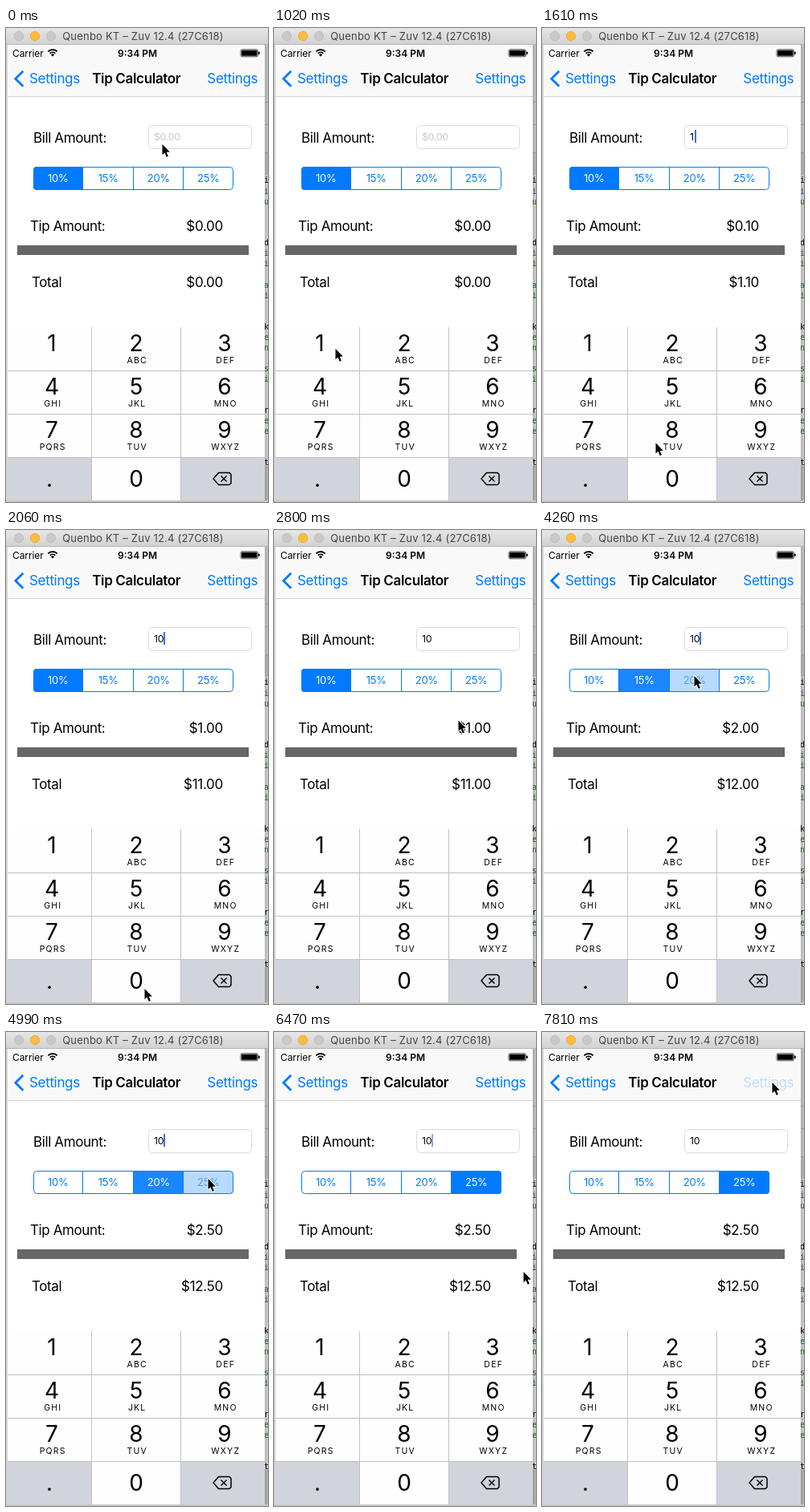
Recreate the animation shown at these times as an HTML page with a canvas. Size 326x591 px, loop 8 s.

```html
<!DOCTYPE html>
<html lang="en">
<head>
<meta charset="utf-8">
<title>Tip Calculator</title>
<style>
  html, body { margin: 0; width: 100%; height: 100%; overflow: hidden; background: #fff; }
  canvas { display: block; width: 326px; height: 591px; }
</style>
</head>
<body>
<canvas id="stage"></canvas>
<script>
const W = 326, H = 591, LOOP = 8000, STEP = 147.1, LAST = 53;
const BLUE = '#007aff', KEY_GREY = '#d1d4da';
const canvas = document.getElementById('stage');
const ctx = canvas.getContext('2d');
const ratio = window.devicePixelRatio || 1;
canvas.width = W * ratio;
canvas.height = H * ratio;
ctx.scale(ratio, ratio);

// Pointer path: [step, x, y]
const path = [
  [0, 194, 145], [2, 176, 185], [5, 99, 348], [7, 76, 400], [9, 79, 408],
  [12, 172, 572], [14, 172, 572], [15, 204, 460], [16, 239, 342],
  [18, 268, 270], [20, 190, 205], [22, 108, 180], [24, 134, 174],
  [26, 134, 174], [28, 189, 182], [30, 189, 182], [32, 251, 183],
  [37, 251, 183], [39, 284, 275], [41, 310, 349], [43, 310, 349],
  [44, 310, 299], [46, 304, 140], [48, 286, 63], [LAST, 286, 63]
];

function pointerAt(step) {
  const i = path.findIndex(p => p[0] >= step);
  const b = path[i], a = path[Math.max(0, i - 1)];
  const k = b[0] === a[0] ? 1 : (step - a[0]) / (b[0] - a[0]);
  return [a[1] + (b[1] - a[1]) * k, a[2] + (b[2] - a[2]) * k];
}

function rect(x, y, w, h, fill) {
  ctx.fillStyle = fill;
  ctx.fillRect(x, y, w, h);
}

function text(str, x, y, size, { color = '#000', weight = 400, align = 'left', track = -0.023 * size, family = 'Inter, Roboto, sans-serif' } = {}) {
  ctx.font = `${weight} ${size}px ${family}`;
  ctx.letterSpacing = track + 'px';
  ctx.textAlign = align;
  ctx.fillStyle = color;
  ctx.fillText(str, x, y);
}

function poly(points, close) {
  ctx.beginPath();
  points.forEach(([x, y]) => ctx.lineTo(x, y));
  if (close) ctx.closePath();
}

function stroke(color, width) {
  ctx.strokeStyle = color;
  ctx.lineWidth = width;
  ctx.stroke();
}

function round(x, y, w, h, r) {
  ctx.beginPath();
  ctx.roundRect(x, y, w, h, r);
}

function drawWindow() {
  rect(0, 0, W, H, '#fff');
  rect(0, 20, 2, H, '#d3d3d3');
  rect(322, 20, 4, 135, '#f0f0f0');
  rect(322, 155, 4, 28, '#e2e2e2');
  rect(322, 546, 4, 45, '#dcdcdc');
  [92, 120, 155].forEach(y => rect(322, y, 4, 1, '#c4c4c4'));
  const code = [
    ['i', 193, '#000'], ['i', 207, '#703daa'], ['u', 220, '#207a20'], ['d', 271, '#000'],
    ['i', 284, '#207a20'], ['i', 297, '#207a20'], ['a', 324, '#207a20'], ['i', 337, '#207a20'],
    ['k', 376, '#000'], ['e', 389, '#207a20'], ['n', 402, '#207a20'], ['s', 428, '#207a20'],
    ['i', 441, '#207a20'], ['r', 480, '#000'], ['e', 493, '#207a20'], ['e', 506, '#207a20'],
    ['t', 545, '#000']
  ];
  code.forEach(([c, y, color]) => text(c, 321, y, 10, { color, track: 0, family: '"DejaVu Sans Mono", monospace' }));

  // Window shadow
  const shade = ctx.createLinearGradient(322, 0, 330, 0);
  shade.addColorStop(0, 'rgba(0,0,0,0.3)');
  shade.addColorStop(1, 'rgba(0,0,0,0.08)');
  rect(322, 20, 4, H, shade);

  const bar = ctx.createLinearGradient(0, 0, 0, 20);
  bar.addColorStop(0, '#e6e6e6');
  bar.addColorStop(1, '#d2d2d2');
  rect(0, 0, W, 20, bar);
  rect(0, 20, W, 1, '#b5b5b5');
  [[16, '#c9c9c9', '#b8b8b8'], [36, '#fdbc40', '#dfa023'], [56, '#c9c9c9', '#b8b8b8']].forEach(([x, fill, edge]) => {
    ctx.beginPath();
    ctx.arc(x, 10, 5.7, 0, 7);
    ctx.fillStyle = fill;
    ctx.fill();
    stroke(edge, 0.7);
  });
  text('Quenbo KT – Zuv 12.4 (27C618)', 170.5, 15, 13, { color: '#444', align: 'center', track: 0.2 });
}

function drawStatus() {
  text('Carrier', 8, 35.5, 12, { track: -0.1 });
  ctx.lineCap = 'butt';
  [4.7, 8].forEach(r => {
    ctx.beginPath();
    ctx.arc(58, 35, r, -Math.PI * 0.75, -Math.PI * 0.25);
    stroke('#000', 1.8);
  });
  ctx.beginPath();
  ctx.moveTo(58, 35.5);
  ctx.arc(58, 35.5, 3, -Math.PI * 0.75, -Math.PI * 0.25);
  ctx.fillStyle = '#000';
  ctx.fill();
  text('9:34 PM', 163.5, 35.5, 12, { weight: 600, align: 'center', track: 0 });
  round(292, 26.8, 21.5, 9, 2);
  stroke('#000', 0.7);
  round(293, 27.8, 19.5, 7, 1);
  ctx.fill();
  round(314.3, 29.5, 1.5, 3.5, 0.7);
  ctx.fill();
}

function drawNav(pressed) {
  rect(2, 21, 320, 64, '#f9f9f9');
  rect(2, 85, 320, 1, '#d0d0d1');
  drawStatus();
  poly([[21.3, 53.8], [11.8, 63.3], [21.3, 72.8]]);
  stroke(BLUE, 2.8);
  text('Settings', 29, 69, 17, { color: BLUE, track: -0.33 });
  text('Tip Calculator', 162.2, 69, 17, { weight: 600, align: 'center', track: -0.33 });
  ctx.globalAlpha = pressed ? 0.22 : 1;
  text('Settings', 250.3, 69, 17, { color: BLUE, track: -0.33 });
  ctx.globalAlpha = 1;
}

function drawField(bill, caret) {
  round(177.5, 121.5, 128, 29, 5);
  stroke('#d9d9d9', 1);
  text(bill || '$0.00', 184, 139.5, 12.3, { color: bill ? '#000' : '#c7c7cd' });
  if (!caret) return;
  ctx.globalAlpha = caret;
  rect(bill.length > 1 ? 196 : 190, 127, 2, 16, '#426bf2');
  ctx.globalAlpha = 1;
}

function drawSegments(selected, pressed) {
  const edges = [34, 96, 159, 221, 283];
  ctx.save();
  round(34, 173, 249, 29, 4);
  ctx.clip();
  for (let i = 0; i < 4; i++) {
    const x = edges[i], w = edges[i + 1] - x;
    let fill = '#fff', color = BLUE;
    if (i === selected) {
      fill = pressed < 0 ? BLUE : '#1a86ff';
      color = '#fff';
    } else if (i === pressed) {
      fill = '#b9daff';
      color = '#4d9fff';
    }
    rect(x, 173, w, 29, fill);
    text(['10%', '15%', '20%', '25%'][i], x + w / 2 - 0.2, 192, 13, { color, align: 'center' });
  }
  ctx.restore();
  edges.slice(1, 4).forEach(x => rect(x - 1, 173, 1, 29, BLUE));
  round(34.5, 173.5, 248, 28, 4);
  stroke(BLUE, 1);
}

function drawForm(bill, rate) {
  const money = n => '$' + n.toFixed(2);
  const tip = bill * rate;
  text('Bill Amount:', 34, 142.5, 17);
  text('Tip Amount:', 30, 252.5, 17);
  text('Total', 32, 322.5, 17);
  text(money(tip), 270, 252.5, 17, { align: 'right', track: -0.28 });
  text(money(bill + tip), 270, 322.5, 17, { align: 'right', track: -0.28 });
  rect(14, 271, 288, 12, '#666');
}

function drawKeypad(pressed) {
  const cols = [[2, 105, 57], [107, 111, 162], [218, 104, 272]];
  const letters = ['', 'ABC', 'DEF', 'GHI', 'JKL', 'MNO', 'PQRS', 'TUV', 'WXYZ'];
  rect(2, 373, 320, 216, '#fefefe');
  for (let i = 0; i < 12; i++) {
    const [x, w, cx] = cols[i % 3], row = Math.floor(i / 3), y = 373 + row * 54;
    const label = i < 9 ? String(i + 1) : ['.', '0', ''][i - 9];
    if (label === pressed || i === 9 || i === 11) rect(x, y, w, 54, KEY_GREY);
    text(label, i === 9 ? 54 : cx, y + (row < 3 ? 30 : 37), 28, { align: 'center', track: 0 });
    if (i < 9) text(letters[i], cx + 1.2, y + 44.7, 10.5, { align: 'center', track: 1.2 });
  }
  [427, 481, 535].forEach(y => rect(2, y, 320, 1, '#bfc1c5'));
  [106, 217].forEach(x => rect(x, 373, 1, 216, '#bfc1c5'));

  ctx.lineJoin = 'round';
  poly([[258, 562], [264.5, 554.5], [278, 554.5], [280, 556.5], [280, 567.5], [278, 569.5], [264.5, 569.5]], true);
  stroke('#000', 1.5);
  poly([[267.5, 558.5], [274.5, 565.5]]);
  stroke('#000', 1.5);
  poly([[274.5, 558.5], [267.5, 565.5]]);
  stroke('#000', 1.5);
  ctx.lineJoin = 'miter';
  rect(0, 589, W, 2, '#c8c8c8');
}

function drawPointer(x, y) {
  ctx.save();
  ctx.translate(x, y);
  poly([[0.5, 0], [0.5, 13.2], [3.5, 10.5], [5.7, 15.8], [7.9, 14.9], [5.7, 9.8], [9.8, 9.6]], true);
  ctx.lineJoin = 'round';
  stroke('#fff', 2);
  ctx.fillStyle = '#000';
  ctx.fill();
  ctx.restore();
}

function caretAlpha(step) {
  if (step < 8) return 0;
  if (step < 17) return 1;
  const phase = step * STEP % 1000;
  if (phase > 990 || phase < 450) return 1;
  return phase < 600 ? 0.6 : 0;
}

function draw(time) {
  const step = Math.min(LAST, Math.floor((time % LOOP + 15) / STEP));
  const bill = step < 8 ? '' : step < 13 ? '1' : '10';
  const choice = [25, 29, 34].filter(s => step >= s).length;
  const pressed = [25, 29, 34].includes(step) ? choice : -1;
  const key = step === 8 ? '1' : step === 13 ? '0' : null;

  drawWindow();
  rect(2, 21, 320, 568, '#fff');
  drawNav(step === LAST);
  drawField(bill, caretAlpha(step));
  drawSegments(pressed < 0 ? choice : choice - 1, pressed);
  drawForm(Number(bill), 0.1 + 0.05 * choice);
  drawKeypad(key);
  drawPointer(...pointerAt(step));
}

function tick(now) {
  draw(now);
  requestAnimationFrame(tick);
}
draw(0);
requestAnimationFrame(tick);
</script>
</body>
</html>
```
